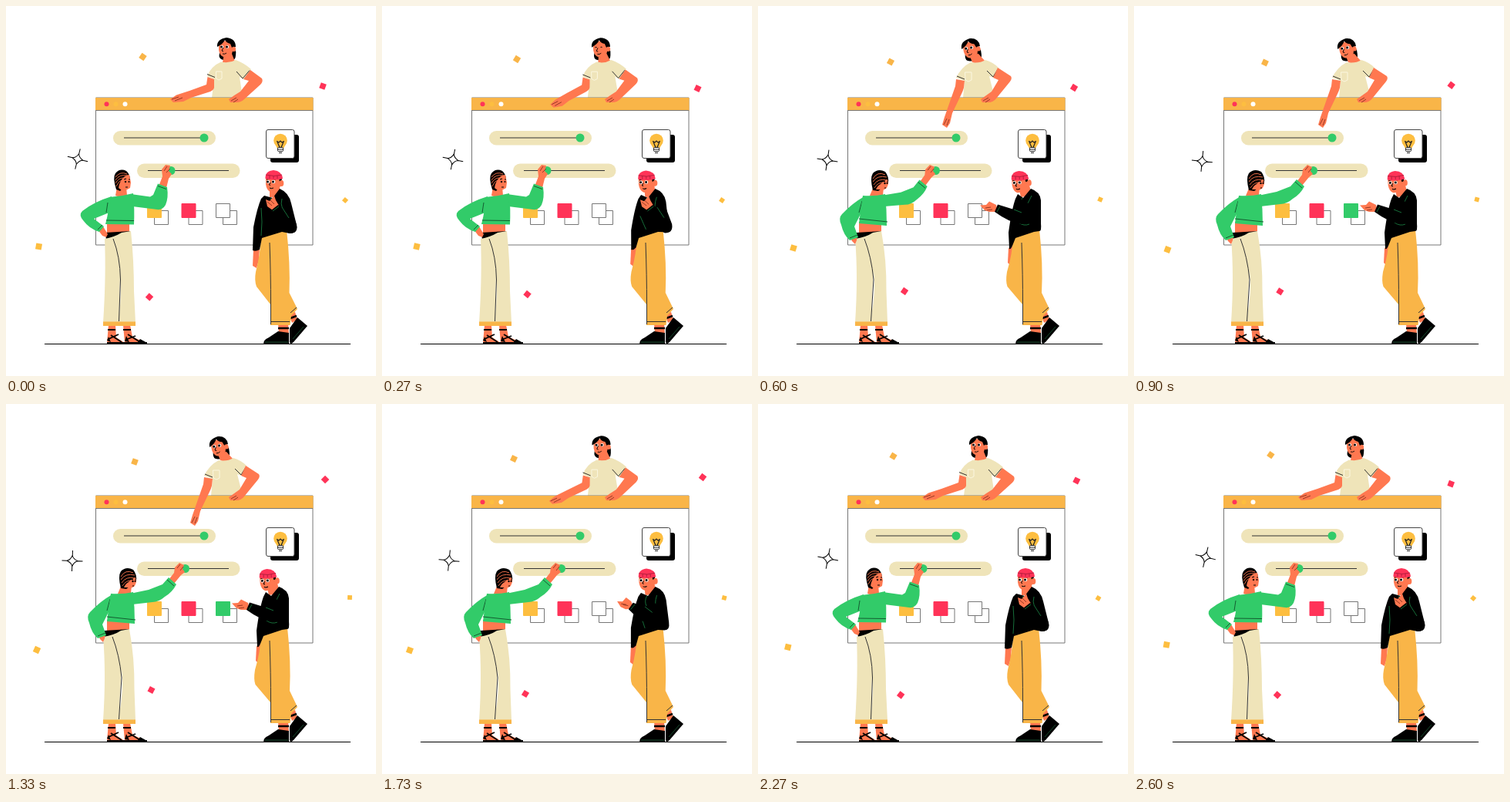
An HTML page with a canvas for the animation above (2.63 s loop, 480 by 480 pixels).

```html
<!DOCTYPE html>
<html lang="en">
<head>
<meta charset="utf-8">
<title>Team building an interface</title>
<style>
html, body { margin: 0; width: 100%; height: 100%; overflow: hidden; background: #fff; }
canvas { display: block; width: 480px; height: 480px; }
</style>
</head>
<body>
<canvas id="stage" width="480" height="480"></canvas>
<script>
const ctx = document.getElementById('stage').getContext('2d');
const LOOP = 2630;
const SKIN = '#ff7850', GREEN = '#32cb69', CREAM = '#efe4b9', ORANGE = '#f9b548',
      YELLOW = '#fdbe40', RED = '#ff3358', BLACK = '#000', WHITE = '#fff', GREY = '#777';

const lerp = (a, b, k) => a + (b - a) * k;
const smooth = (from, to, t) => {
  const x = Math.min(1, Math.max(0, (t - from) / (to - from)));
  return x * x * (3 - 2 * x);
};
// Rises from 0 to 1, holds, then falls back to 0.
const pulse = (t, a, b, c, d) => smooth(a, b, t) - smooth(c, d, t);

// Blends two paths that share the same commands.
const NUMBER = /-?\d+(\.\d+)?/g;
function blend(a, b, k) {
  if (!b || k === 0) return new Path2D(a);
  const ends = b.match(NUMBER);
  let i = 0;
  return new Path2D(a.replace(NUMBER, v => lerp(+v, +ends[i++], k)));
}
function fill(color, a, b, k = 0) {
  ctx.fillStyle = color;
  ctx.fill(blend(a, b, k));
}
function line(color, width, a, b, k = 0) {
  ctx.strokeStyle = color;
  ctx.lineWidth = width;
  ctx.stroke(blend(a, b, k));
}
function oval(color, x, y, rx, ry = rx) {
  ctx.fillStyle = color;
  ctx.beginPath();
  ctx.ellipse(x, y, rx, ry, 0, 0, 7);
  ctx.fill();
}
function box(x, y, w, h, r, color, edge) {
  ctx.beginPath();
  ctx.roundRect(x, y, w, h, r);
  if (color) { ctx.fillStyle = color; ctx.fill(); }
  if (edge) { ctx.strokeStyle = edge; ctx.lineWidth = 1; ctx.stroke(); }
}
function placed(x, y, degrees, draw) {
  ctx.save();
  ctx.translate(x, y);
  ctx.rotate(degrees * Math.PI / 180);
  draw();
  ctx.restore();
}

const KEYS = [0, 270, 600, 1330, 1730, 2000, LOOP];
function along(values, t) {
  const i = Math.max(0, KEYS.findIndex(key => key > t) - 1);
  return lerp(values[i], values[i + 1], (t - KEYS[i]) / (KEYS[i + 1] - KEYS[i]));
}

const CONFETTI = [
  { color: ORANGE, size: 7.5, turn: [35, -15], x: [177.5, 175, 172, 167, 171, 174, 177.5], y: [66, 69, 72.5, 75, 71, 69, 66] },
  { color: RED, size: 7.5, turn: [20, 25], x: [411, 409.5, 410, 414, 416, 415, 411], y: [104, 107, 106, 98, 95, 96, 104] },
  { color: YELLOW, size: 5.8, turn: [42, -40], x: [440, 441, 444, 446, 444, 442.5, 440], y: [252, 252, 251, 251, 251.5, 252, 252] },
  { color: YELLOW, size: 7.8, turn: [10, 15], x: [42.5, 45, 46, 40, 36, 36, 42.5], y: [312, 312, 314, 319, 319.5, 318, 312] },
  { color: RED, size: 7.4, turn: [42, -15], x: [186, 188.5, 190, 188.5, 186, 184.5, 186], y: [377.5, 374, 370, 371, 376, 377.5, 377.5] }
];

function floating(t) {
  const swing = 1 - Math.abs(1 - 2 * t / LOOP);
  for (const { color, size, turn, x, y } of CONFETTI)
    placed(along(x, t), along(y, t), turn[0] + turn[1] * swing,
      () => box(-size / 2, -size / 2, size, size, 0, color));

  placed(along([93, 92, 90, 86, 87, 89, 93], t), along([198.5, 199, 200, 203.5, 203, 202, 198.5], t),
    14 - 12 * swing, () => {
      for (let i = 0; i < 4; i++) {
        line(BLACK, 1, 'M0 -13.5 L0 -7 Q1 -2.5 7 0');
        ctx.rotate(Math.PI / 2);
      }
    });
}

function windowPanel(t, knob) {
  box(116.5, 119, 281.5, 191, 0, WHITE, GREY);
  box(116, 119, 282.5, 17, 0, ORANGE);
  line(GREY, 1, 'M116 135.5 L398 135.5');
  [RED, YELLOW, WHITE].forEach((color, i) => oval(color, 130.5 + i * 12, 127.2, 3));

  box(139, 162, 133, 18.5, 9.2, CREAM);
  line('#333', 1, 'M153 171 L257 171');
  oval(GREEN, 257, 171, 5.5);
  box(170, 204.5, 133.5, 18.5, 9.2, CREAM);
  line('#333', 1, 'M184 213.5 L289 213.5');
  oval(GREEN, knob, 213.5, 5.5);

  box(343, 167, 37, 36, 3, BLACK);
  box(337.5, 160.5, 36.5, 37, 2.5, WHITE, '#444');
  oval(YELLOW, 356, 174.5, 8.8);
  fill(YELLOW, 'M349 179 L352 185 L360 185 L363 179 Z');
  box(352.5, 183.5, 7, 5, 1, WHITE, '#222');
  line('#222', 1.2, 'M351.5 175 L355 183.5 M360.5 175 L357 183.5 M351.5 175.5 L354 177 L356 175 L358 177 L360.5 175.5 M353 186 L359 186 M354 190.5 L358 190.5');

  const lit = t > 650 && t < 1530;
  [YELLOW, RED, lit ? GREEN : WHITE].forEach((color, i) => {
    const x = 183 + i * 44.5;
    box(x + 9.5, 265.5, 18, 18, 0, null, GREY);
    box(x + .5, 256.5, 18, 18, 0, color, color === WHITE ? GREY : color);
  });
}

function leaner(k, blink) {
  placed(lerp(286, 276.5, k), lerp(55, 56, k), -10 * k, () => {
    fill(BLACK, 'M-9 6 Q-11 14 -4 15 L3 16 Q12 17 12 9 Q13 5 11 0 L0 0 Z');
  });
  fill(SKIN, 'M283 62 L293 62 L297 72 Q290 77 281 73 Z', 'M274 63 L286 62 L295 72 Q286 77 278 73 Z', k);
  fill(CREAM, 'M279 72.5 Q289 75 298 70 Q309 74 318 82 L308 95 L303 92 L307 119 L267 119 L270 95 L261 91 Q266 78 279 72.5 Z',
    'M276 73 Q287 75 295 70 Q305 73 312 80 L305 93 L300 91 L307 119 L266 119 L268 97 L257 93 Q264 79 276 73 Z', k);
  line('#333', 1, 'M261 88.5 L271 92.5 M299 85 L307 94 L316 83.5', 'M258 91 L268 95 M297 84 L305 92 L311 82', k);
  line('#fbf7e0', 1, 'M272.5 85 L280 85 L280 94 L276 96 L272.5 94 Z', 'M268.5 86 L277 86 L277 96 L273 98 L269 96 Z', k);

  placed(lerp(286, 276.5, k), lerp(55, 56, k), -10 * k, () => {
    fill(SKIN, 'M-10 -7 Q-1 -13 7 -6 L9 0 L7 7 Q2 12 -4 11 Q-9 9 -10 2 Z');
    fill(BLACK, 'M-12 -2 Q-13 -12 0 -14 Q12 -13 12 -2 L7 -1 L5 -6 Q0 -7 -2 -11 Q-4 -6 -12 -2 Z');
    oval(SKIN, 9.5, 1, 2.6, 3.2);
    for (const x of [-6.5, .5]) {
      oval(WHITE, x + .5, -2, 2.1, lerp(2.1, .1, blink));
      oval(BLACK, x, -2, 1.5, lerp(1.5, .5, blink));
    }
    line(BLACK, .9, 'M-4 -1 L-6 3 L-4 4 M-5 7 Q-2 8 0 6');
  });
}

function leanerArms(k) {
  fill(SKIN, 'M317 83 L332 94 Q334 98 330 102 L309 121 Q305 125 299 125 L291 125 L289 121 L296 116 L304 111 L315 97 L308 95 Z',
    'M311 80 L328 91 Q330 94 327 98 L309 120 Q305 125 299 125 L291 125 L289 121 L296 116 L303 111 L312 96 L305 93 Z', k);
  line('#7a2a1a', .8, 'M292 123 L299 119 M295 125 L301 121');
  fill(SKIN, 'M261.5 92 L270 95 L270 106 Q269 110 262 112 L240 119 L230 124 L217 125 L213 121 L221 115.5 L238 110 L260 102 Z',
    'M257 95 L268 97 L267 106 Q266 110 264 114 L252 139 L249 152 L245 158 L239 154 L242 144 L249 124 L256 104 Z', k);
  line('#7a2a1a', .8, 'M215 121 L224 118 M219 123 L229 119', 'M241 154 L245 146 M245 155 L248 147', k);
}

function woman(body, arm) {
  fill(SKIN, 'M133 414 L142 414 L143 430 L154 437 L131 437 Z M152 414 L161 414 L164 429 L181 437 L154 437 Z');
  line(BLACK, 2, 'M131 437 L155 437 M154 437 L183 437');
  line(BLACK, 1.8, 'M132 420 L142 420 M133 432 L146 426 M136 427 L150 436 M152 420 L162 420 M155 433 L168 428 M158 426 L174 436');
  fill(BLACK, 'M131 434 L133 429 L136 436 Z M154 435 L156 428 L160 436 Z M170 437 L174 432 L183 437 Z');

  fill(SKIN, 'M131 280 L160 280 L160 296 L131 296 Z');
  fill(BLACK, 'M129 294 L161 292 L158 298 L130 304 Z', 'M128 294 L160 292 L158 298 L128 304 Z', body);
  fill(CREAM, 'M128 302 Q140 300 150 294 L162 292 Q166 330 166 370 L168 411 L126 411 Q130 350 128 302 Z',
    'M126 302 Q140 300 149 294 L160 292 Q167 330 166.5 370 L168 411 L126 411 Q130 350 126 302 Z', body);
  fill(WHITE, 'M148 352 Q150 372 147 400 Q147 375 148 352 Z', 'M150 344 Q153 370 147 402 Q147.5 372 150 344 Z', body);
  line('#333', 1, 'M139 302 Q148 325 148.5 355 L146.5 409', 'M138 302 Q147 325 150 355 L146.5 409', body);
  box(126, 409.5, 42, 5.5, 0, ORANGE);

  fill(SKIN, 'M119 290 L126 286 L132 296 L130 300 L125 298 Z', 'M119 299 L129 297 L128 304 L126 309 L122 305 Z', body);
  fill(GREEN, 'M137 247 Q114 254 99 266 Q94 271 100 278 Q108 289 121 293 L127 286 L114 276 L134 268 Z',
    'M138 247 Q122 256 109 270 Q104 275 108 284 Q111 297 119 304 L130 300 L125 286 L134 268 Z', body);
  line('#145c30', 1, 'M119 290 L125 284 M132 255 L130 268', 'M119 301 L129 297 M135 253 L131 268', body);

  fill(SKIN, 'M144 234 L156 234 L157 246 Q149 249 142 246 Z', 'M151 232 L163 236 L162 245 Q152 249 145 246 Z', body);
  fill(GREEN, 'M134 248 Q150 247 165 243 Q167 264 166 283.5 L129 283 Q134 265 134 248 Z',
    'M136 246 Q151 247 165 244 Q167 264 167 285 L131 282 Q133 264 136 246 Z', body);
  line('#145c30', 1, 'M130 278 L166 278.5', 'M131 276 L168 280', body);
  womanHead(body);

  fill(SKIN, 'M198 234 L203 221 L202 212 L207 206 L213 207 L211 214 L215 218 L211 224 L208 236 Z',
    'M211 228 L218 219 L219 212 L225 206 L231 209 L229 214 L232 218 L227 222 L218 233 Z', arm);
  line('#7a2a1a', .8, 'M205 214 L209 208 M208 216 L213 211', 'M222 213 L226 208 M226 216 L230 211', arm);
  fill(GREEN, 'M162 244 L187 247.5 L191 245 L197 230.5 L209 235 Q211 249 207 258 Q203 265 196 264 L164 260 Z',
    'M161 246 L185 241 L203 234 L211 225 L221 234 Q216 244 206 250 Q198 257 190 257 L164 260 Z', arm);
  line('#145c30', 1, 'M197 233.5 L208 237.5', 'M209 228 L218 236', arm);
}

function womanHead(k) {
  fill(BLACK, 'M143 238 Q138 222 142 217 Q148 210 156 214 Q161 218 161 226 L148 240 Z',
    'M149 239 Q145 223 149 217 Q156 210 165 215 Q170 221 169 230 L156 240 Z', k);
  fill(SKIN, 'M151 224 Q155 219 160 219 L162 229 L161 236 Q156 240 150 239 L146 236 Q147 229 151 224 Z',
    'M159 231 Q164 226 168 225 L169 231 L167 236 Q163 240 158 238 L153 238 Q155 233 159 231 Z', k);
  line(SKIN, .9, 'M142 222 Q148 214 157 218 M142 226 Q147 218 157 220 M142 230 Q146 223 152 223 M143 234 Q146 227 150 226',
    'M149 224 Q155 214 165 219 M149 228 Q155 219 167 222 M150 232 Q156 223 167 226 M151 236 Q156 228 164 229', k);
  line(BLACK, 1.1, 'M153 225 L156 224 M159 225 L161 225 M155 235 L158 235',
    'M163 228 L165 227 M167 228 L168 228 M164 236 L166 236', k);
  oval(BLACK, lerp(155, 164.5, k), lerp(228, 230, k), 1.2);
  oval(BLACK, lerp(159.5, 167.5, k), lerp(228, 230, k), 1);
}

function man(body, arm, drift) {
  fill(SKIN, 'M353 412 L366 412 L367 425 L354 425 Z M367 400 L375 397 L378 407 L371 411 Z');
  line(BLACK, 2.5, 'M353 418 L367 418 M369 405 L377 402');
  fill(BLACK, 'M353 422 L367 424 L367 439 L335 439 Q332 434 341 430 Z');
  fill(BLACK, 'M378 404 L391 415 L373 436 Q369 440 368 436 L368 418 Z');
  line('#1c5c38', .8, 'M336 436 L366 436 M372 432 L386 416');

  fill(SKIN, 'M321 316 L329 314 L328 330 L325 340 L320 337 Z', 'M325 314 L333 310 L331 328 L328 337 L324 333 Z', body);
  fill(ORANGE, 'M331 298 L364 290 Q369 335 367.5 372 L378 393 L370 402 L368.5 414 L343 414 L343 387 L325 364 Q322 356 324 345 Q330 322 331 298 Z',
    'M331 298 L365 290 Q370 335 368 372 L378 393 L370 402 L368.5 414 L343 414 L343 387 L323.5 364 Q321 357 323 345 Q330 322 331 298 Z', body);
  line('#333', 1, 'M342 307 Q343.5 350 343.5 386 L343.5 413 M344 409.5 L368 409.5 M369 398 L377 391');

  const hx = lerp(347, 339.5, body), hy = lerp(228, 229, body);
  fill(SKIN, 'M342 234 L355 234 L356 248 L342 248 Z', 'M338 234 L352 232 L355 246 L341 248 Z', body);
  fill(BLACK, 'M335 246 L346 249 L355 237 Q367 242 370 256 L377 284 Q379 295 368 295 L358 293 L332 301 L329 316 Q324 319 320 317 L321 287 Q326 261 331 250 Z',
    'M337 244 L344 249 L354 237 Q366 241 367 252 L367 282 Q368 292 365 292 L358 293 L334 301 L330 311 Q328 316 326 315 L325 294 Q329 264 334 250 Z', body);
  line('#1c8a48', .8, 'M344 249 Q342 256 344 262 M358 250 Q354 262 368 277 M331 262 Q333 280 331 298',
    'M343 249 Q338 256 342 262 M355 246 Q351 256 345 262 M338 281 Q345 286 352 283', body);
  manHead(hx, hy, body);

  placed(drift, 0, 0, () => {
    fill(SKIN, 'M356 262 L346 265 L339 260 L337 251 L342 253 L348 246 L350 252 Z',
      'M311 267 L300 267 L294 265 L288 258.5 L296 258 L300 253.5 L309 258 Z', arm);
    line('#7a2a1a', .8, 'M339 254 L345 259 M343 252 L348 257', 'M295 262 L302 261 M297 265 L304 264', arm);
    fill(BLACK, 'M344 265 L353 258 L366 266 L368 258 L377 284 Q379 295 368 295 Q360 292 344 265 Z',
      'M307 267 L311 257.5 L332 264 L336 248 L358 260 Q355 284 342 283 Q326 281 307 267 Z', arm);
    line('#1c8a48', .8, 'M346 266 L354 260 M358 261 L367 275', 'M310 267 L314 260 M332 264 L342 268', arm);
  });
}

function manHead(x, y, k) {
  placed(x, y, -3 * k, () => {
    fill(BLACK, 'M4 -6 L11 -6 L10 5 L5 7 Z');
    fill(SKIN, 'M-10 -6 L7 -6 L8 1 L7 8 Q3 14 -4 13 Q-9 11 -10 3 Z');
    oval(SKIN, lerp(10.5, 12.5, k), lerp(2, 1, k), 2.8, 4);
    fill(SKIN, 'M4 0 L11 -1 L11 5 L6 8 Z');
    for (const eye of [-7, 0]) {
      oval(WHITE, eye, 0, 2.3);
      oval(BLACK, eye - .5 + k * .3, 0, 1.5);
    }
    line(BLACK, 1, 'M-9 -3 L-6 -3.5 M-1 -3.5 L3 -3 M-4 1 L-5.5 4 L-4 5 M-5 8 Q-3 9.5 0 8');
    fill(RED, 'M-10.5 -4 Q-11 -14 0 -15 Q11 -14 12 -4 Q1 -1 -10.5 -4 Z');
    line('#a31a38', .8, 'M-10 -9 Q1 -6 11 -9 M-5 -8 L-5 -4 M0 -7.5 L0 -4 M5 -8 L5 -4');
  });
}

function draw(now) {
  const t = now % LOOP;
  const reach = pulse(t, 170, 520, 1450, 1820);
  const blink = pulse(t, 190, 250, 300, 360);
  const turn = pulse(t, 290, 580, 1740, 1990);
  const slide = pulse(t, 300, 680, 1770, 2130);
  const sway = pulse(t, 80, 440, 1500, 1950);
  const point = pulse(t, 230, 560, 1580, 1960);
  const drift = 5 * pulse(t, 600, 850, 1450, 1700);

  ctx.fillStyle = WHITE;
  ctx.fillRect(0, 0, 480, 480);
  floating(t);
  leaner(reach, blink);
  windowPanel(t, lerp(214, 232.5, slide));
  leanerArms(reach);
  line(BLACK, 1, 'M50 438.5 L447 438.5');
  woman(turn, slide);
  man(sway, point, drift);
  requestAnimationFrame(draw);
}
requestAnimationFrame(draw);
</script>
</body>
</html>
```
